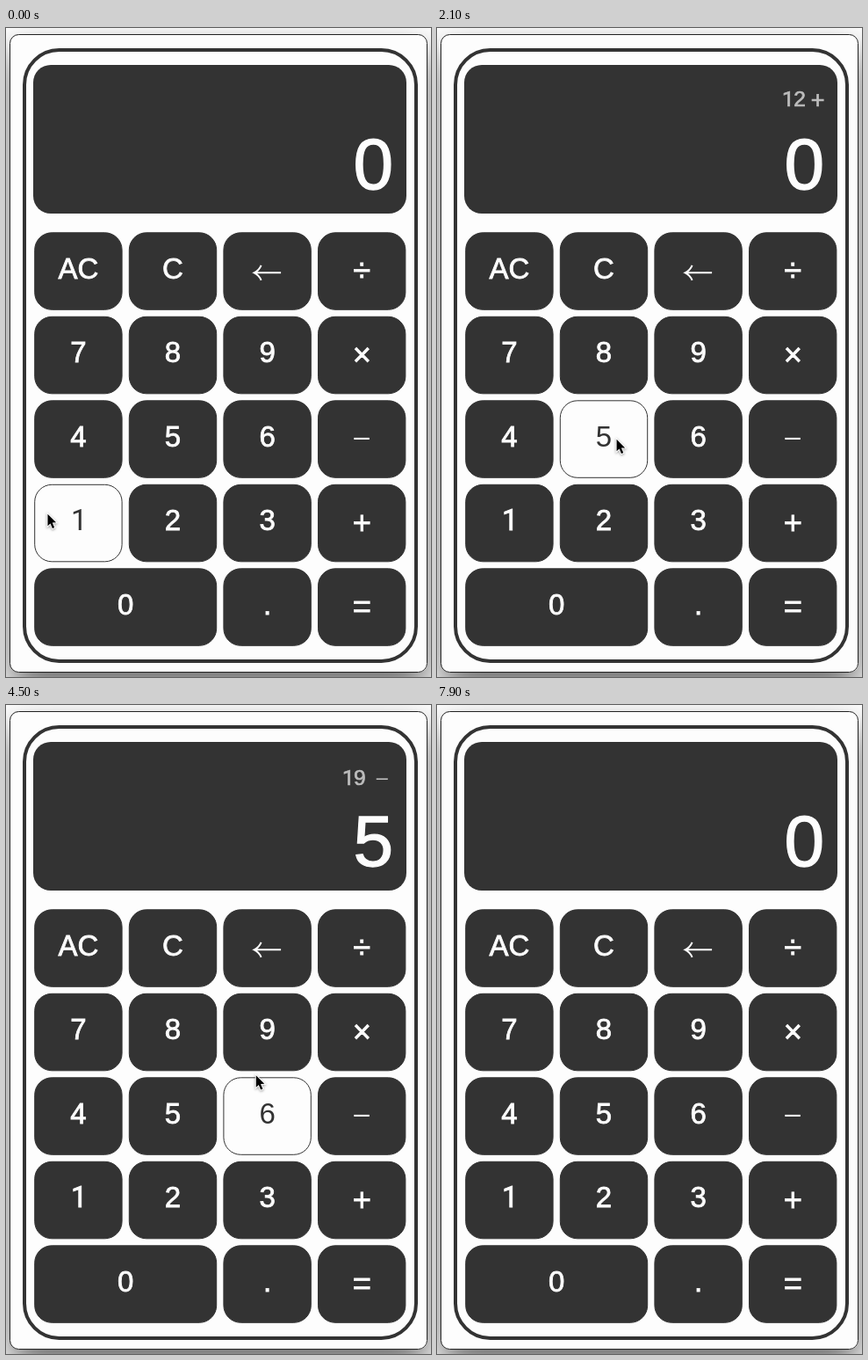
These frames come from a looping animation (484 by 738 pixels, 9000 ms). An HTML page with a canvas:

```html
<!DOCTYPE html>
<html lang="en">
<head>
<meta charset="utf-8">
<title>Calculator</title>
<style>
html, body { margin: 0; width: 100%; height: 100%; overflow: hidden; background: #fff; }
canvas { display: block; width: 484px; height: 738px; }
</style>
</head>
<body>
<canvas id="stage" width="484" height="738"></canvas>
<script>
const ctx = document.getElementById('stage').getContext('2d');
const DARK = '#333', LIGHT = '#fdfdfd', GREY = '#bdbdbd';
const SANS = '"Liberation Sans", Arial, sans-serif';
const LOOP = 9000, STEP = 100, HOLD = 200;

const LEFT = 32.2, TOP = 232.3, PITCH_X = 107.6, PITCH_Y = 95.5, KEY_W = 100.4, KEY_H = 88.5;
const ROWS = [['AC', 'C', '←', '÷'], ['7', '8', '9', '×'], ['4', '5', '6', '–'],
              ['1', '2', '3', '+'], ['0', '0', '.', '=']];

// pointer stops in key units; a tapped key is held until the pointer leaves
const stop = (arrive, leave, col, row, tap = true) => ({ arrive, leave, col, row, tap });
const STOPS = [
  stop(0, 0, -0.33, 2.94, false),
  stop(200, 400, 0, 3),
  stop(700, 900, 1, 3),
  stop(1400, 1600, 2.75, 3),
  stop(2100, 2400, 1.13, 2.05, false),
  stop(2700, 2900, 0.1, 1.2),
  stop(3300, 3800, 3, 2),
  stop(4100, 4400, 1, 2),
  stop(4800, 5000, 3, 1),
  stop(5400, 5700, 2.27, 2.87),
  stop(6000, 6200, 3, 4),
  stop(7100, 7100, -0.15, -2.4, false),
  stop(7500, 7700, 0, 0)
];
const hidden = t => (t > 6300 && t < 7100) || t >= 7900;

const easeOut = k => 1 - (1 - k) ** 2;
const keyAt = s => ROWS[Math.round(s.row)][Math.round(s.col)];

function pointerAt(t) {
  if (hidden(t)) return null;
  const i = STOPS.findLastIndex(s => s.arrive <= t);
  const from = STOPS[i], to = STOPS[i + 1] ?? from;
  // the way out after "=" is mostly unseen, so it stays on its key
  const moving = t > from.leave && !hidden(to.arrive - STEP);
  const k = moving && to !== from ? easeOut((t - from.leave) / (to.arrive - from.leave)) : 0;
  return {
    x: 82.5 + PITCH_X * (from.col + (to.col - from.col) * k),
    y: 272 + PITCH_Y * (from.row + (to.row - from.row) * k)
  };
}

const compute = (a, op, b) =>
  op === '+' ? a + b : op === '–' ? a - b : op === '×' ? a * b : a / b;

// replays every tap released so far
function calculate(t) {
  let entry = '0', note = '', total = 0, op = '', fresh = true;
  for (const s of STOPS) {
    if (!s.tap || s.leave > t) continue;
    const key = keyAt(s);
    if (/\d/.test(key)) {
      entry = fresh ? key : entry + key;
      fresh = false;
      continue;
    }
    fresh = true;
    const result = op ? compute(total, op, +entry) : +entry;
    if (key === 'AC') {
      entry = '0';
      note = op = '';
    } else if (key === '=') {
      note += ` ${entry} =`;
      entry = String(result);
      op = '';
    } else {
      entry = op ? String(result) : '0';
      total = result;
      op = key;
      note = `${total} ${op}`;
    }
  }
  return { entry, note };
}

function box(x, y, w, h, r) {
  ctx.beginPath();
  ctx.roundRect(x, y, w, h, r);
}

function advance(ch, size) {
  if (ch === '–') return size;
  ctx.font = `${size}px ${SANS}`;
  return ctx.measureText(ch).width;
}

// light text on dark looks slightly heavier
function glyph(ch, x, y, size, color) {
  ctx.fillStyle = ctx.strokeStyle = color;
  ctx.lineWidth = 0.5 + size * 0.01;
  ctx.lineJoin = 'miter';
  ctx.miterLimit = 3;
  ctx.fillText(ch, x, y);
  if (color !== DARK && ch !== '–') ctx.strokeText(ch, x, y);
}

// operators sit with their ink centred on the middle of the digits
function operator(ch, cx, cy, size, color) {
  ctx.font = `${size * (ch === '–' ? 0.96 : 1.1)}px ${SANS}`;
  const m = ctx.measureText(ch);
  glyph(ch, cx + (m.actualBoundingBoxLeft - m.actualBoundingBoxRight) / 2,
    cy + (m.actualBoundingBoxAscent - m.actualBoundingBoxDescent) / 2, size, color);
}

// align: 0.5 centres on x, 1 ends at x
function write(str, x, base, size, align, color) {
  const widths = [...str].map(ch => advance(ch, size));
  let pen = x - align * widths.reduce((a, b) => a + b, 0);
  [...str].forEach((ch, i) => {
    if ('÷×–+='.includes(ch)) {
      operator(ch, pen + widths[i] / 2, base - 0.27 * size, size, color);
    } else {
      // the footless one comes from Roboto
      const one = ch === '1';
      ctx.font = `${size}px ${one ? 'Roboto, ' : ''}${SANS}`;
      glyph(ch, pen + (one ? 0.02 * size : 0), base, size, color);
    }
    pen += widths[i];
  });
}

function backArrow(cx, cy, color) {
  ctx.strokeStyle = color;
  ctx.lineWidth = 2;
  ctx.beginPath();
  ctx.moveTo(cx + 15.5, cy);
  ctx.lineTo(cx - 14.5, cy);
  ctx.moveTo(cx - 7, cy - 8.5);
  ctx.quadraticCurveTo(cx - 9.5, cy - 2.5, cx - 15, cy);
  ctx.quadraticCurveTo(cx - 9.5, cy + 2.5, cx - 7, cy + 8.5);
  ctx.stroke();
}

function drawFrame() {
  ctx.fillStyle = '#fff';
  ctx.fillRect(0, 0, 484, 738);
  ctx.save();
  ctx.shadowColor = 'rgba(0,0,0,.6)';
  ctx.shadowBlur = 40;
  ctx.shadowOffsetY = 19;
  ctx.fillStyle = LIGHT;
  box(5, 8, 475, 725, 10);
  ctx.fill();
  ctx.restore();
  ctx.strokeStyle = '#222';
  ctx.lineWidth = 1;
  box(4.5, 7.5, 475, 725, 10);
  ctx.stroke();
  ctx.strokeStyle = DARK;
  ctx.lineWidth = 4;
  box(21, 25, 446, 695, 39.5);
  ctx.stroke();
}

function drawScreen(t) {
  const { entry, note } = calculate(t);
  ctx.fillStyle = DARK;
  box(31, 42, 425, 169, 20);
  ctx.fill();
  write(note, 441, note.endsWith('–') ? 91 : 88.5, 24.5, 1, GREY);
  write(entry, 441, 183, 82, 1, LIGHT);
}

function drawKey(label, col, row, hot, down) {
  const x = LEFT + col * PITCH_X, y = TOP + row * PITCH_Y + (down ? 2 : 0);
  const w = KEY_W + (label === '0' ? PITCH_X : 0), ink = hot ? DARK : LIGHT;
  ctx.fillStyle = hot ? LIGHT : DARK;
  ctx.strokeStyle = DARK;
  ctx.lineWidth = 1;
  box(x + 0.5, y + 0.5, w - 1, KEY_H - 1, 19.5);
  ctx.fill();
  ctx.stroke();
  if (label === '←') backArrow(x + w / 2, y + 46, ink);
  else write(label, x + w / 2, y + 52.6, 33, 0.5, ink);
}

function drawPointer({ x, y }) {
  ctx.save();
  ctx.translate(x + 0.5, y);
  ctx.beginPath();
  [[0, 0], [0, 13.5], [3, 10.7], [5.4, 16.2], [7.7, 15.2], [5.3, 9.8], [9.6, 9.6]]
    .forEach(p => ctx.lineTo(...p));
  ctx.closePath();
  ctx.shadowColor = 'rgba(0,0,0,.4)';
  ctx.shadowBlur = 3;
  ctx.shadowOffsetY = 1;
  ctx.lineWidth = 2;
  ctx.strokeStyle = '#fff';
  ctx.stroke();
  ctx.shadowColor = 'transparent';
  ctx.fillStyle = '#000';
  ctx.fill();
  ctx.restore();
}

function render(now) {
  const t = Math.floor((now % LOOP) / STEP) * STEP;
  const pointer = pointerAt(t);
  const down = STOPS.some(s => s.tap && t >= s.leave - HOLD && t < s.leave);
  const hotCol = pointer ? Math.floor((pointer.x - 25) / PITCH_X) : -1;
  const hotRow = pointer ? Math.floor((pointer.y - 225) / PITCH_Y) : -1;
  drawFrame();
  drawScreen(t);
  ROWS.forEach((keys, row) => keys.forEach((label, col) => {
    if (row === 4 && col === 1) return;
    const hot = row === hotRow && col === hotCol;
    drawKey(label, col, row, hot, hot && down);
  }));
  if (pointer) drawPointer(pointer);
}

let start;
function tick(now) {
  start ??= now;
  render(now - start);
  requestAnimationFrame(tick);
}
render(0);
requestAnimationFrame(tick);
</script>
</body>
</html>
```
